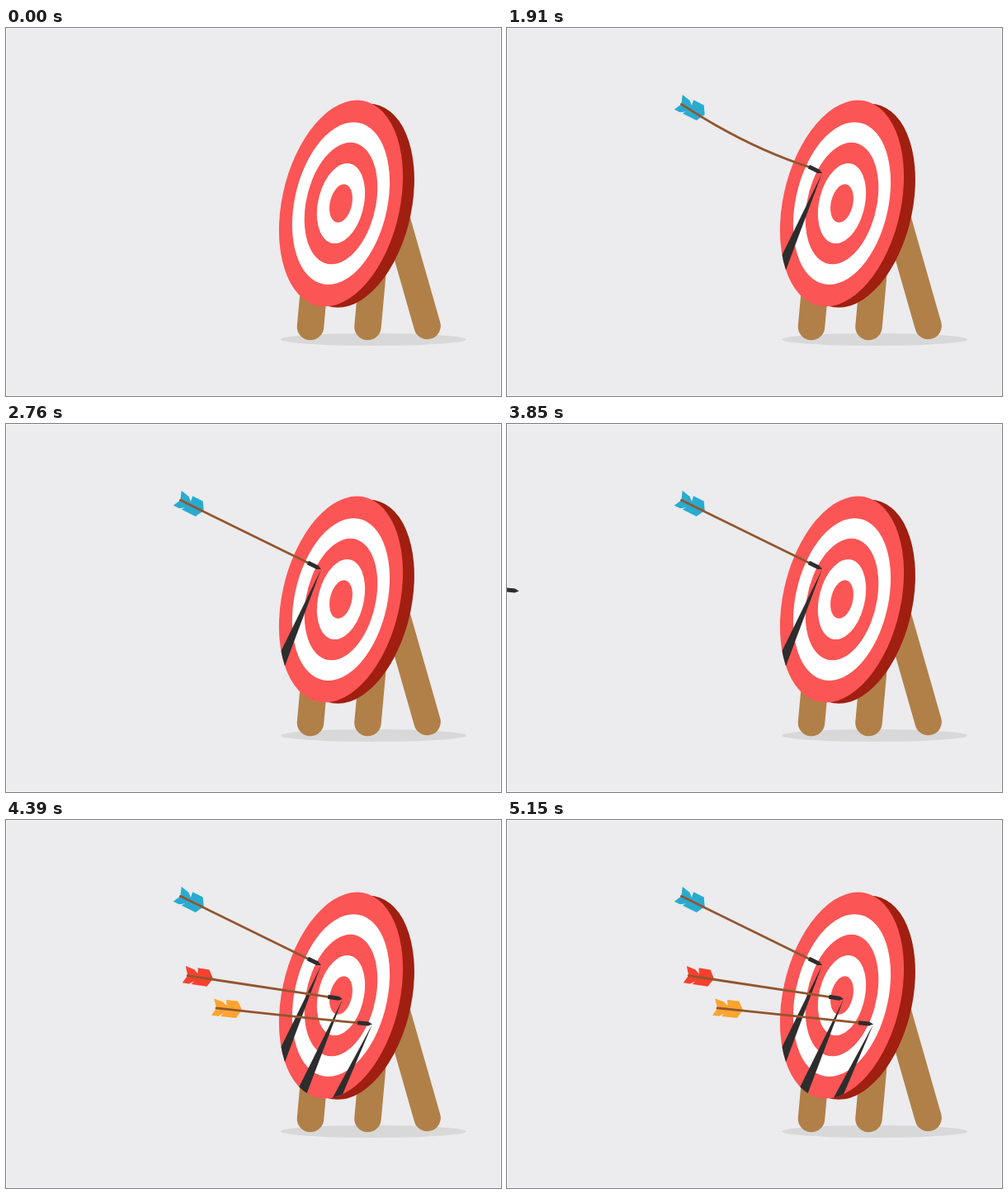
An HTML page that plays this animation: 600x446 px, repeating every 6000 ms.

```html
<!DOCTYPE html>
<html lang="en">
<head>
<meta charset="utf-8">
<title>Arrows and target</title>
<style>
  html, body { margin: 0; width: 100%; height: 100%; overflow: hidden; background: #ecebed; }
  svg { display: block; width: 600px; height: 446px; }
</style>
</head>
<body>
<svg viewBox="0 0 600 446">
  <defs>
    <clipPath id="face"><circle r="1" transform="matrix(72.5 0 -19.5 125 406 212.6)"/></clipPath>
  </defs>
  <rect width="600" height="446" fill="#ecebed"/>
  <rect x=".5" y=".5" width="599" height="445" fill="none" stroke="#fff" stroke-opacity=".7"/>
  <ellipse cx="445.5" cy="377.5" rx="112.5" ry="7.5" fill="#d8d8d8"/>
  <g stroke="#b08048" stroke-width="32.5" stroke-linecap="round">
    <path d="M373 318L369 362M445 290L438.500 362M460.600 186L510.600 361"/>
  </g>
  <circle r="1" transform="matrix(71.5 0 -18.8 123.5 421 215.3)" fill="#a01f10"/>
  <g id="rings" transform="matrix(72.5 0 -19.5 125 406 212.6)"></g>
  <g id="shadows" clip-path="url(#face)" fill="#2d2d2d"></g>
  <g id="arrows"></g>
</svg>
<script>
const LOOP = 6000, SPEED = 2.36, PERIOD = 240, LENGTH = 190;

// tip and tail positions, where the flight begins, slope of the shadow,
// first visible and landing times, end of wobble
const arrows = [
  { tip: [382, 176], tail: [211.3, 92.3], from: [-335, -173], lean: .49, show: 1450, land: 1610, rest: 2770, color: '#29abd0' },
  { tip: [408, 217], tail: [219.5, 188.5], from: [-408, -62], lean: .495, show: 3960, land: 4152, rest: 5160, color: '#f8402f' },
  { tip: [444, 247.6], tail: [256, 228], from: [-428, -45], lean: .54, show: 3850, land: 4034, rest: 5070, color: '#fba430' }
];

function add(parent, tag, attrs) {
  const el = document.createElementNS('http://www.w3.org/2000/svg', tag);
  for (const key in attrs) el.setAttribute(key, attrs[key]);
  return parent.appendChild(el);
}
const byId = id => document.getElementById(id);
const clamp = x => Math.min(1, Math.max(0, x));

[1, .787, .59, .388, .186].forEach((r, i) =>
  add(byId('rings'), 'circle', { r, fill: i % 2 ? '#fff' : '#fc5555' }));

for (const a of arrows) {
  a.angle = Math.atan2(a.tip[1] - a.tail[1], a.tip[0] - a.tail[0]) * 180 / Math.PI;
  a.shadow = add(byId('shadows'), 'path', { d: `M0 0L${-130 * a.lean} 130h15Z` });
  a.group = add(byId('arrows'), 'g', {});
  add(a.group, 'path', {
    transform: `translate(${-LENGTH} 0)`, fill: a.color,
    d: 'M0 0L-4-11L7-8.500L12-4L11-11H25L31-1L25 9.500H6L9 5.500L3 9.500H-5Z'
  });
  a.shaft = add(a.group, 'path', { fill: 'none', stroke: '#92552d', 'stroke-width': 2.8, 'stroke-linecap': 'round' });
  add(a.group, 'path', { d: 'M-18-2.500H-5L0 0L-5 2.500H-18Z', fill: '#2d2d2d' });
}

function drawArrow(a, t) {
  const visible = t >= a.show;
  a.group.style.display = visible ? '' : 'none';
  a.shadow.style.display = t > a.land ? '' : 'none';
  if (!visible) return;

  const left = Math.max(0, (a.land - t) * SPEED) / Math.hypot(...a.from);
  const [x, y] = a.tip.map((p, i) => p + a.from[i] * left);
  a.group.setAttribute('transform', `translate(${x} ${y}) rotate(${a.angle})`);

  // the shaft quivers and settles in a straight line
  const since = Math.max(0, t - a.land);
  const bend = 8 * clamp((a.rest - t) / (a.rest - a.land)) * Math.sin(since / PERIOD * 2 * Math.PI);
  a.shaft.setAttribute('d', `M${-LENGTH} 0Q${-LENGTH / 2} ${2 * bend} -16 0`);

  a.shadow.setAttribute('transform', `translate(${a.tip}) scale(${clamp(since / 80)})`);
}

const start = performance.now();
function frame() {
  const t = (performance.now() - start) % LOOP;
  for (const a of arrows) drawArrow(a, t);
  requestAnimationFrame(frame);
}
frame();
</script>
</body>
</html>
```
